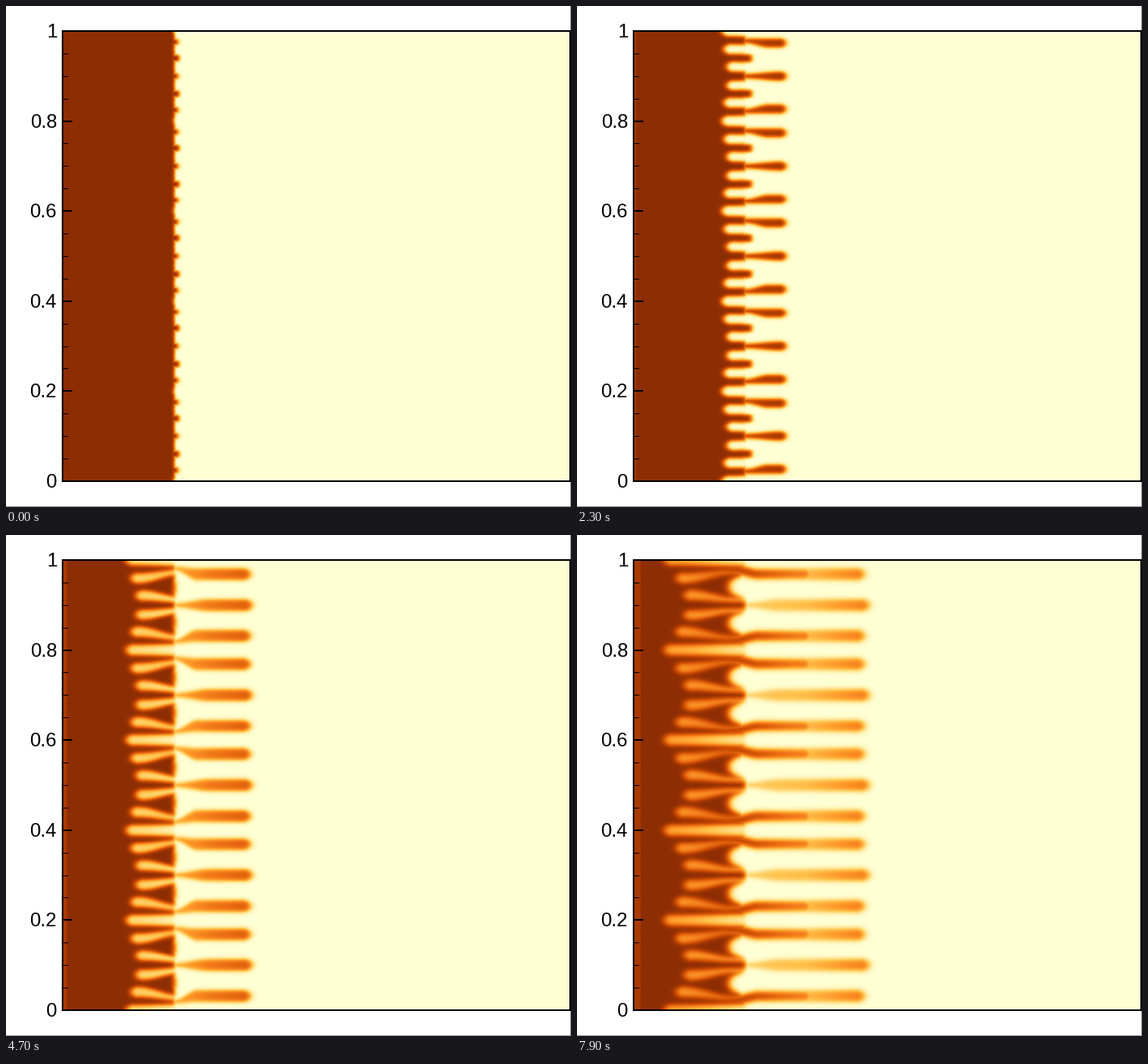
A matplotlib script for the animation above (8000 ms loop, 699 px wide and 621 px high).

```python
import numpy as np
import matplotlib.pyplot as plt
from matplotlib.animation import FuncAnimation
from matplotlib.colors import LinearSegmentedColormap
from matplotlib.patches import Rectangle

W, H, DPI = 699, 621, 100
STEP, FRAMES = 100, 80
LEFT, RIGHT, TOP, BOTTOM = 70, 698, 31, 589
X_MAX = 400
PERIOD = (BOTTOM - TOP) / 5      # the pattern repeats and mirrors along y
HALF = PERIOD / 2
START = 209                      # resting place of the front

CMAP = LinearSegmentedColormap.from_list(
    "amber", ["#ffffd4", "#fee391", "#fec44f", "#fe9929",
              "#ec7014", "#cc4c02", "#8c2d04"], N=96)

x = np.arange(LEFT, X_MAX) + 0.5
v = np.linspace(0, HALF, 113)[:, None]

# Row of the half cell used by each pixel row
up = (BOTTOM - (np.arange(TOP, BOTTOM) + 0.5)) % PERIOD
rows = np.rint(np.minimum(up, PERIOD - up) / HALF * 112).astype(int)


def ease(s, a, b):
    """Smooth step from 0 at a to 1 at b."""
    q = np.clip((s - a) / (b - a), 0, 1)
    return q * q * (3 - 2 * q)


def ramp(x0, x1, a, b):
    return a + (b - a) * ease(x, x0, max(x1, x0 + 1))


def soft(d, w):
    return 0.5 * (1 + np.tanh(d / w))


def ribbon(tip, way, mid, half, w):
    """Soft band around mid with a round end at tip; way is 1 for right."""
    over = np.maximum(way * (x - tip) / 1.5 + half, 0)
    return soft(half - np.hypot(over, v - mid), w)


def light_fingers(s, front):
    """Tip, end, centres, half widths and darkness at both ends."""
    bend = ease(s, 0.25, 0.6)
    dim = 0.5 * ease(s, 0.2, 1)
    yield 209 - 101 * s, 230, 0, 0, 6, 7, 0.9 * dim, 0.2 * dim
    yield (211 - 103 * s + 15 * s**2, front + 4, 22.5, 23 - 8 * bend,
           5.6, 5.5 - 2.5 * bend, dim, 0.7 * ease(s, 0.4, 0.8))
    yield (212 - 95 * s + 16 * s**2, front + 4, 44.4 - s, 45 + 4 * bend,
           5.6, 5.5 - 2.5 * bend, dim, 0.55 * ease(s, 0.4, 0.9))


def dark_finger(s, tip, c0, c1, length, w):
    """Finger that leaves the front through a neck and fades with time."""
    neck = START
    mid = ramp(neck, neck + length, c0, c1)
    half = ramp(neck, neck + length, 4 - 1.5 * ease(s, 0, 0.5),
                4.2 + 3 * ease(s, 0, 0.6))
    shade = [1 - 0.7 * ease(s, 0.1, 0.8), 1 - 0.62 * ease(s, 0.1, 1),
             1 - 0.38 * ease(s, 0.1, 0.9)]
    amp = np.interp(x, [neck, (neck + tip) / 2, tip - 4], shade)
    return amp * soft(x - neck + 12, 4) * ribbon(tip, 1, mid, half, w)


def tongue(s, w):
    """Dark stream that later flows out of the front into a finger."""
    tip = 200 + 230 * (s - 0.6)
    mid = ramp(195, 225, 12, 12 + 5.3 * ease(s, 0.65, 0.85))
    half = 3 + 3 * ease(s, 0.65, 1)
    fade = ramp(195, tip, 0.88, 0.88 - 0.25 * ease(s, 0.65, 0.95))
    grow = ease(s, 0.45, 0.65) * soft(x - 180, 4)
    return grow * fade * ribbon(tip, 1, mid, half, w)


def field(i):
    s = i / FRAMES
    w = 2.2 + 1.5 * s
    front = 216 + 22 * s - 50 * s**2

    # The front grows a short blunt head that turns into a round bay
    c = soft(START - x, w) * np.ones_like(v)
    c = np.maximum(c, ribbon(front, 1, 33.5, 4.2 + 8 * ease(s, 0.1, 0.6), w))
    for tip, end, c0, c1, h0, h1, r0, r1 in light_fingers(s, front):
        band = ribbon(tip, -1, ramp(tip + 8, end, c0, c1),
                      ramp(tip + 8, end, h0, h1), w)
        c = c * (1 - (1 - ramp(tip, end, r0, r1)) * band)
    c = c * (1 - ribbon(front, -1, 33, ramp(front + 8, front + 28, 12.5, 18), w))

    reach = 213 + 164 * s - 14 * s**2
    c0 = 13.5 - 3 * ease(s, 0.1, 0.5)
    c1 = 13.5 + 4 * ease(s, 0.1, 0.6)
    for dark in (dark_finger(s, reach - 6 * s**2, c0, c1, 28, w),
                 dark_finger(s, reach, HALF, HALF, 42, w),
                 tongue(s, w)):
        c = np.maximum(c, dark)

    pale = 0.08 * ease(s, 0, 0.4) * soft(8 * s - (x - LEFT - 1), 1)
    return (c * (1 - pale))[rows]


fig = plt.figure(figsize=(W / DPI, H / DPI), dpi=DPI, facecolor="white")
ax = fig.add_axes([0, 0, 1, 1])
ax.set_axis_off()


def box(x0, y0, x1, y1, color, z=1):
    ax.add_patch(Rectangle((x0, y0), x1 - x0, y1 - y0, fc=color, lw=0,
                           antialiased=False, zorder=z))


img = ax.imshow(field(0), cmap=CMAP, vmin=0, vmax=1, interpolation="nearest",
                extent=(LEFT, X_MAX, BOTTOM, TOP), aspect="auto", zorder=2)
ax.set_xlim(0, W)
ax.set_ylim(H, 0)

box(W - 1, 0, W, H, "#999999")
box(0, H - 1, W, H, "#999999")
box(LEFT, TOP, RIGHT, BOTTOM, CMAP(0.0))

for y in (TOP, BOTTOM):
    box(LEFT - 1, y - 1, RIGHT + 1, y + 1, "black", 4)
for xe in (LEFT, RIGHT):
    box(xe - 1, TOP - 1, xe + 1, BOTTOM + 1, "black", 4)

for i in range(21):
    y = BOTTOM - i * (BOTTOM - TOP) / 20
    yr = int(np.ceil(y - 0.5))
    if i % 4:
        box(LEFT, yr, LEFT + 7, yr + 1, "black", 4)
    else:
        box(LEFT, yr - 1, LEFT + 12, yr + 1, "black", 4)
        ax.text(63, y + 8, f"{i / 20:g}", ha="right", va="baseline",
                family="Liberation Sans", fontsize=24 * 72 / DPI, zorder=5)


def update(i):
    img.set_data(field(i))
    return [img]


anim = FuncAnimation(fig, update, frames=FRAMES, interval=STEP,
                     repeat=True, repeat_delay=0, blit=False)
plt.show()
```
